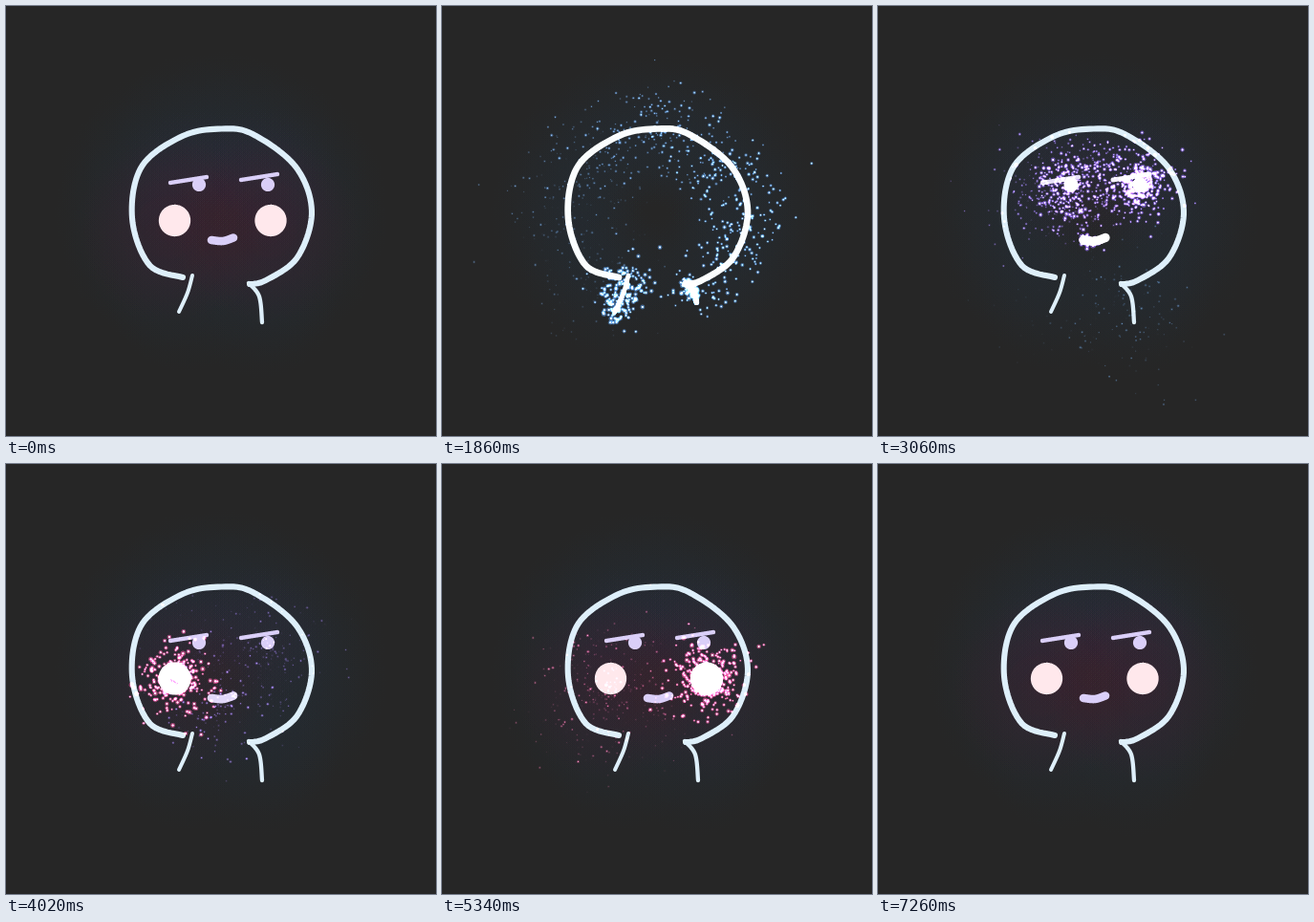
Animation, 450 px wide and 450 px high, one loop 7.56 s. Source, as an HTML page with a canvas:

```html
<!DOCTYPE html>
<html lang="en">
<head>
<meta charset="utf-8">
<title>Sparkle drawing</title>
<style>
html, body { margin: 0; width: 100%; height: 100%; overflow: hidden; background: #262626; }
canvas { display: block; width: 450px; height: 450px; }
</style>
</head>
<body>
<canvas id="stage" width="450" height="450"></canvas>
<script>
const ctx = document.getElementById('stage').getContext('2d');
const LOOP = 7560, STEP = 60, REST = 7260, BLANK_END = 360;
const TAU = Math.PI * 2, WHITE = [255, 255, 255];
const clamp = v => Math.max(0, Math.min(1, v));
const mix = (a, b, k) => a.map((v, i) => v + (b[i] - v) * k);
const rgba = (c, a = 1) => `rgba(${c.map(Math.round).join()},${a})`;

let seed = 20;
function rnd() {
  seed = (seed + 0x6D2B79F5) | 0;
  let t = Math.imul(seed ^ (seed >>> 15), 1 | seed);
  t = (t + Math.imul(t ^ (t >>> 7), 61 | t)) ^ t;
  return ((t ^ (t >>> 14)) >>> 0) / 4294967296;
}

// Catmull-Rom curve through the given points
function curve(...pts) {
  const out = [];
  const at = i => pts[Math.max(0, Math.min(pts.length - 1, i))];
  for (let i = 0; i < pts.length - 1; i++) {
    const [a, b, c, d] = [at(i - 1), at(i), at(i + 1), at(i + 2)];
    for (let s = 0; s < 1; s += 1 / 16) {
      out.push(b.map((v, n) => v + 0.5 * s * (c[n] - a[n] +
        s * (2 * a[n] - 5 * v + 4 * c[n] - d[n] + s * (3 * (v - c[n]) + d[n] - a[n])))));
    }
  }
  return [...out, at(pts.length)];
}

// One full circle, then two turns inward
function spiral(x, y, r) {
  return Array.from({ length: 97 }, (_, i) => {
    const k = i / 96, q = r * Math.min(1, 1.5 * (1 - k)), a = k * 3 * TAU - 1.5;
    return [x + q * Math.cos(a), y + q * Math.sin(a)];
  });
}

// Spread points evenly so that index is proportional to length
function even(pts, n = 120) {
  const len = [0];
  for (let i = 1; i < pts.length; i++) {
    len.push(len[i - 1] + Math.hypot(pts[i][0] - pts[i - 1][0], pts[i][1] - pts[i - 1][1]));
  }
  let j = 1;
  return Array.from({ length: n + 1 }, (_, i) => {
    const d = i / n * len[len.length - 1];
    while (j < pts.length - 1 && len[j] < d) j++;
    return mix(pts[j - 1], pts[j], clamp((d - len[j - 1]) / (len[j] - len[j - 1])));
  });
}

// rate: sparks per ms
const BLUE = { line: [222, 239, 250], spark: [74, 150, 240], glow: [33, 51, 68], reach: 82, alpha: 0.14, life: 1550, rate: 0.95 };
const VIOLET = { line: [218, 207, 248], spark: [142, 92, 255], glow: [58, 48, 82], reach: 75, alpha: 0.05, life: 1550, rate: 1.4 };
const PINK = { line: [255, 232, 236], spark: [255, 72, 150], glow: [86, 24, 46], reach: 98, alpha: 0.15, life: 1950, rate: 0.72 };

const shapes = [];
let clock = BLANK_END;
function add(ink, width, time, path, pow = 1) {
  const pts = even(path), xs = pts.map(p => p[0]);
  const lamps = Math.max(1, Math.round((Math.max(...xs) - Math.min(...xs)) / 14));
  shapes.push({ ink, width, pts, pow, lamps, from: clock, to: clock + time });
  clock += time + 60;
}

add(BLUE, 6.1, 1040, curve([185, 284], [150, 271], [132, 222], [142, 168], [185, 136], [226, 128.5],
  [258, 134], [303, 168], [320, 215], [305, 263], [272, 287], [255, 291]), 1.4);
add(BLUE, 4, 220, curve([195, 282], [190, 300], [181, 320]));
add(BLUE, 4.3, 220, curve([254, 290], [265, 304], [268, 331]));
for (const [x, y] of [[172, 185], [246, 182]]) add(VIOLET, 4.4, 200, curve([x, y], [x + 38, y - 6]));
for (const x of [202, 274]) add(VIOLET, 7, 160, spiral(x, 187, 3.6));
add(VIOLET, 8.6, 80, curve([215, 245], [227, 246], [238, 242.5]));
for (const [x, pause] of [[176.5, 280], [277, 560]]) {
  clock += pause;
  add(PINK, 7.4, 670, spiral(x, 224.5, 13));
}

function pointAt(s, k) {
  const f = k * (s.pts.length - 1), i = Math.floor(f);
  return mix(s.pts[i], s.pts[Math.min(i + 1, s.pts.length - 1)], f - i);
}

const sparks = shapes.flatMap(s => Array.from({ length: s.ink.rate * (s.to - s.from) }, () => {
  const u = rnd(), [x, y] = pointAt(s, u ** s.pow), a = rnd() * TAU;
  const reach = 90 * rnd() ** 0.8 * (rnd() < 0.12 ? 1.7 : 1);
  return {
    x, y, ink: s.ink,
    born: s.from + u * (s.to - s.from),
    dx: reach * Math.cos(a), dy: reach * Math.sin(a),
    life: s.ink.life * (0.7 + 0.3 * rnd()),
    size: 0.75 + 0.85 * rnd()
  };
}));

function disc(x, y, r, fill) {
  ctx.fillStyle = fill;
  ctx.beginPath();
  ctx.arc(x, y, r, 0, TAU);
  ctx.fill();
}

function halo(x, y, r, color, alpha) {
  const g = ctx.createRadialGradient(x, y, 0, x, y, r);
  g.addColorStop(0, rgba(color, alpha));
  g.addColorStop(0.5, rgba(color, alpha * 0.55));
  g.addColorStop(1, rgba(color, 0));
  disc(x, y, r, g);
}

const progress = (s, t) => clamp((t - s.from) / (s.to - s.from)) ** s.pow;
const flash = (s, t) => 1 - clamp((t - s.to - 350) / 750);

// Lamps along the path light up slowly once the line has passed them
function drawGlow(s, t) {
  for (let i = 0; i < s.lamps; i++) {
    const k = (i + 0.5) / s.lamps;
    const lit = clamp((t - s.from - (s.to - s.from) * k ** (1 / s.pow)) / 500);
    if (lit > 0) halo(...pointAt(s, k), s.ink.reach, s.ink.glow, s.ink.alpha * lit);
  }
}

function drawLine(s, t) {
  const k = progress(s, t);
  if (k <= 0) return;
  const f = flash(s, t), last = Math.floor(k * (s.pts.length - 1));
  ctx.lineCap = ctx.lineJoin = 'round';
  ctx.lineWidth = s.width + 0.7 * f;
  ctx.strokeStyle = rgba(mix(s.ink.line, WHITE, f));
  ctx.beginPath();
  for (const p of s.pts.slice(0, last + 1)) ctx.lineTo(...p);
  ctx.lineTo(...pointAt(s, k));
  ctx.stroke();
}

function drawSpark(p, t) {
  const age = t - p.born;
  if (age < 0 || age >= p.life) return;
  const move = 1 - Math.exp(-age / 900), left = 1 - age / p.life;
  const x = p.x + p.dx * move, y = p.y + p.dy * move + 8 * (age / 1000) ** 2;
  const r = p.size * (0.35 + 0.65 * left), a = Math.min(1, left * 2);
  disc(x, y, r * 1.9, rgba(p.ink.spark, 0.45 * a));
  disc(x, y, r * 0.8, rgba(mix(p.ink.spark, WHITE, 0.35 + 0.5 * left), a));
}

function draw(t) {
  ctx.fillStyle = '#262626';
  ctx.fillRect(0, 0, 450, 450);
  if (t < STEP) t = REST;
  if (t < BLANK_END) return;
  shapes.forEach(s => drawGlow(s, t));
  shapes.forEach(s => drawLine(s, t));
  ctx.globalCompositeOperation = 'lighter';
  sparks.forEach(p => drawSpark(p, t));
  ctx.globalCompositeOperation = 'source-over';
}

const start = performance.now();
let shown = -1;
function tick() {
  const now = (performance.now() - start) % LOOP;
  const t = Math.min(REST, Math.floor(now / STEP) * STEP);
  if (t !== shown) draw(shown = t);
  requestAnimationFrame(tick);
}
tick();
</script>
</body>
</html>
```
